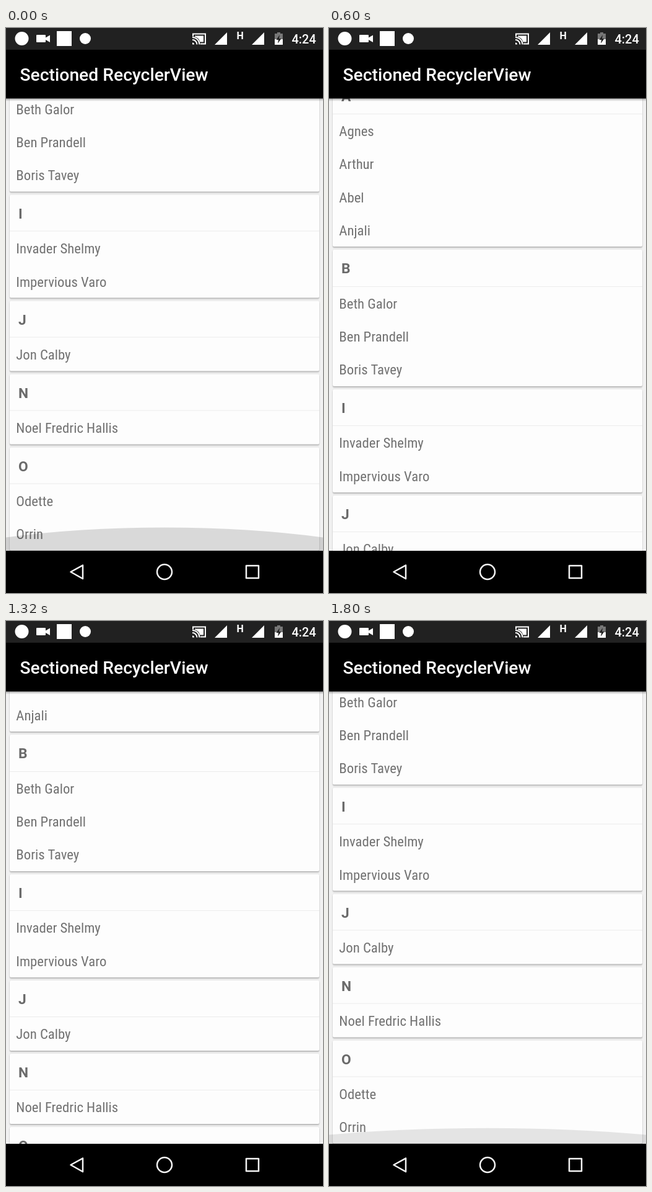
Animation, 512 px wide and 910 px high, one loop 1920 ms. Source, as an HTML page:

```html
<!DOCTYPE html>
<html lang="en">
<head>
<meta charset="utf-8">
<title>Sectioned RecyclerView</title>
<style>
  html, body { margin: 0; width: 100%; height: 100%; overflow: hidden; background: #000; }
  #stage { position: relative; width: 512px; height: 910px; overflow: hidden; font-family: Roboto, sans-serif; }
  #view { position: absolute; top: 113px; width: 512px; height: 729px; overflow: hidden; background: #f1f1f1; }
  #list { padding: 6.5px 6px 0; }
  .card {
    margin-bottom: 5px; background: #fdfdfd; border-radius: 2px;
    box-shadow: 0 2px 2px rgba(0, 0, 0, .22), 0 0 2px rgba(0, 0, 0, .12);
  }
  .card h2 {
    box-sizing: border-box; height: 59.5px; margin: 0; padding: 2px 0 0 14px;
    border-bottom: 1px solid #ececec; font: bold 22.75px/58px Roboto, sans-serif; color: #6a6a6a;
  }
  .card p {
    height: 53.33px; margin: 0; padding-left: 10.3px; color: #727272;
    font: 22.75px/55px "Roboto Condensed", Roboto, sans-serif; font-stretch: 75%; white-space: nowrap;
  }
  .card span { display: inline-block; transform-origin: 0 50%; }
  .wide span { transform: scaleX(.88); }
  #glow { position: absolute; left: 0; top: 0; }
  #shade { position: absolute; top: 0; width: 512px; height: 5px; background: linear-gradient(rgba(0,0,0,.34), rgba(0,0,0,0)); }
  #chrome { position: absolute; left: 0; top: 0; }
</style>
</head>
<body>
<div id="stage">
  <div id="view">
    <div id="list"></div>
    <svg id="glow" width="512" height="729"><path id="arc"/></svg>
    <div id="shade"></div>
  </div>
  <svg id="chrome" width="512" height="910" fill="#fff">
    <path d="M0 0H512V113.5H0ZM0 842H512V910H0Z" fill="#000"/>
    <path d="M0 0H512V35H0Z" fill="#212121"/>

    <circle cx="25.5" cy="17" r="11"/>
    <path d="M50 11H63Q64 11 64 12V15.500L71 11.500V23L64 19V22Q64 23 63 23H50Q49 23 49 22V12Q49 11 50 11Z"/>
    <rect x="82" y="5" width="24" height="24"/>
    <circle cx="128" cy="17" r="9"/>

    <g transform="translate(300 5.500)">
      <path d="M2 8V4H22V20H14M1 13.500A7.500 7.500 0 0 1 8.500 21M1 9.500A11.500 11.500 0 0 1 12.500 21" fill="none" stroke="#fff" stroke-width="2"/>
      <path d="M1 18A3 3 0 0 1 4 21H1ZM5 7H19V17H13.400A12 12 0 0 0 5 8.600Z"/>
    </g>
    <path d="M357 7V27H337ZM417 7V27H397Z"/>
    <text x="372.500" y="18" font-size="16" font-weight="700">H</text>
    <path d="M438 7H443V9H447V27H434V9H438Z" fill="#777"/>
    <path d="M434 18H447V27H434Z"/>
    <path d="M442 11L436.500 19H440L439 25L444.500 17H441Z" fill="#212121"/>
    <text x="461.500" y="25" font-size="19.900" font-weight="500">4:24</text>
    <text x="22.500" y="85" font-size="28.300" font-weight="500">Sectioned RecyclerView</text>

    <g fill="none" stroke="#f4f4f4" stroke-width="2.500" stroke-linejoin="round">
      <path d="M104.500 876L124 865.300V887Z"/>
      <circle cx="256" cy="876" r="12"/>
      <rect x="388" y="866" width="20" height="20"/>
    </g>
  </svg>
</div>
<script>
const $ = id => document.getElementById(id);
const list = $('list'), arc = $('arc');
const sections = {
  A: ['Agnes', 'Arthur', 'Abel', 'Anjali'],
  B: ['Beth Galor', 'Ben Prandell', 'Boris Tavey'],
  I: ['Invader Shelmy', 'Impervious Varo'],
  J: ['Jon Calby'],
  N: ['Noel Fredric Hallis'],
  O: ['Odette', 'Orrin']
};

list.innerHTML = Object.entries(sections).map(([letter, names]) =>
  `<div class="card"><h2>${letter}</h2>${names.map(n => `<p><span>${n}</span></p>`).join('')}</div>`
).join('');

// Narrow the rows evenly when no condensed face is available.
const probe = list.querySelector('span');
const condensed = probe.offsetWidth;
probe.style.font = '22.75px Roboto, sans-serif';
if (condensed >= probe.offsetWidth) list.className = 'wide';
probe.style.font = '';

const STEP = 120, LOOP = 1920, END = 353.5;
// Scroll position at each step; the last value holds.
const scroll = [END, END, END, 340, 272.5, 40, 0, 0, 0, 0, 50, 214, 335, END];
// Overscroll glows: first step, remaining fraction, full height, opacity per pixel.
const glows = [
  { from: 0, left: .608, size: 101.5, tint: .0038, bottom: true },
  { from: 6, left: .795, size: 134.5, tint: .00305 },
  { from: 13, left: .9, size: 101.5, tint: .0038, bottom: true }
];

function drawGlow(step) {
  const g = glows.filter(g => g.from <= step).pop();
  const u = Math.max(0, g.left - (step - g.from) * STEP / 600);
  const h = g.size * u * u, side = .57 * h;
  arc.setAttribute('d', h < .5 ? '' : `M0 0V${side}A512 ${3.2 * h} 0 0 0 512 ${side}V0Z`);
  arc.setAttribute('transform', g.bottom ? 'translate(0 729) scale(1 -1)' : 'translate(0 1)');
  arc.setAttribute('fill-opacity', h * g.tint);
}

function draw(now) {
  const step = Math.floor(now % LOOP / STEP);
  list.style.transform = `translateY(${-scroll[Math.min(step, scroll.length - 1)]}px)`;
  drawGlow(step);
}

const start = performance.now();
function tick() {
  draw(performance.now() - start);
  requestAnimationFrame(tick);
}
tick();
</script>
</body>
</html>
```
